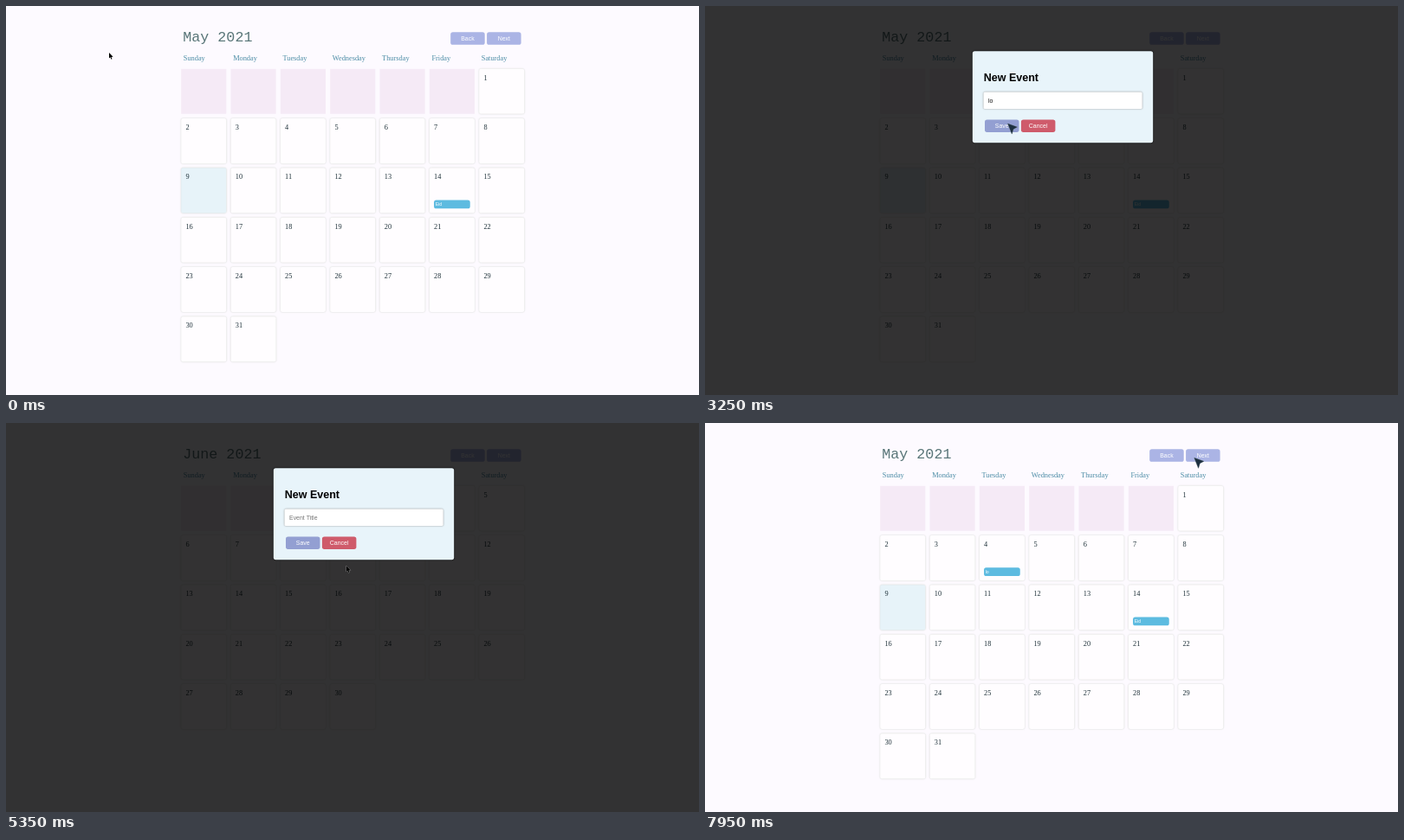
Recreate the animation shown at these times as an HTML page with a canvas. Size 800x450 px, loop 8 s.

```html
<!DOCTYPE html>
<html lang="en">
<head>
<meta charset="utf-8">
<title>Calendar</title>
<style>
  html, body { margin: 0; width: 100%; height: 100%; overflow: hidden; background: #fdfaff; }
  canvas { display: block; }
</style>
</head>
<body>
<canvas id="stage" width="800" height="450"></canvas>
<script>
const ctx = document.getElementById('stage').getContext('2d');
const LOOP = 8000, STEP = 50;
const SANS = '"Liberation Sans", Arial, sans-serif';
const SERIF = '"Liberation Serif", "Times New Roman", serif';
const MONO = '"Liberation Mono", "Courier New", monospace';
const WEEKDAYS = ['Sunday', 'Monday', 'Tuesday', 'Wednesday', 'Thursday', 'Friday', 'Saturday'];
const MAY = { title: 'May 2021', pad: 6, days: 31, today: 9 };
const JUNE = { title: 'June 2021', pad: 2, days: 30 };

const GRID = { x: 202.2, y: 72.7, pitch: 57.33, size: 52.1 };
const MODAL = { x: 308.8, y: 52.2, w: 208.4, h: 106 };
const INPUT = { x: 321.5, y: 99.5, w: 183.2, h: 19.6 };
const buttonRect = (x, y) => ({ x, y, w: 39.5, h: 14.5 });
const BACK = buttonRect(513.2, 30.3), NEXT = buttonRect(555.1, 30.3);
const SAVE = buttonRect(323, 131.4), CANCEL = buttonRect(364.9, 131.4);

// Each session types one character per step once typing begins.
const SESSIONS = [
  { open: 2000, caret: 2750, typing: 2800, close: 3550, word: 'lo' },
  { open: 4800, caret: 5750, typing: 5950, close: 6850, word: 'hello' }
];
const JUNE_SHOWN = 4100, MAY_SHOWN = 7600;

// Pointer moves: a straight line plus a one-sided bow and a two-sided swing.
const spot = (x, y) => ({ x, y });
const NONE = spot(0, 0);
const START = spot(119, 54), FIELD = spot(352, 115.5), SAVE_EDGE = spot(354, 132);
const move = (begin, end, to, bow = NONE, swing = NONE) => ({ begin, end, to, bow, swing });
const MOVES = [
  move(50, 400, spot(143, 187), spot(413, 0), spot(0, -70)),
  move(850, 900, spot(671, 72)),
  move(1000, 1750, spot(359.5, 159), NONE, spot(130, 105)),
  move(2000, 2500, FIELD),
  move(2950, 3300, spot(346, 139.5), spot(6, 0)),
  move(3550, 3900, spot(567, 39)),
  move(4100, 4550, spot(401.2, 175.5), spot(-210, 0)),
  move(5300, 5600, FIELD),
  move(5900, 6200, SAVE_EDGE),
  move(6400, 6650, spot(347.5, 141)),
  move(6850, 7250, spot(533, 38)),
  move(7650, 7950, spot(564.8, 40.3))
];

function pointerAt(t) {
  let from = START;
  for (const { begin, end, to, bow, swing } of MOVES) {
    if (t <= begin) break;
    if (t < end) {
      const k = (t - begin) / (end - begin);
      const along = axis => from[axis] + (to[axis] - from[axis]) * k +
        bow[axis] * Math.sin(Math.PI * k) + swing[axis] * Math.sin(2 * Math.PI * k);
      return spot(along('x'), along('y'));
    }
    from = to;
  }
  return from;
}

const inside = (p, r) => p.x >= r.x && p.x <= r.x + r.w && p.y >= r.y && p.y <= r.y + r.h;

function text(str, x, y, size, family, color, align = 'left', weight = '') {
  ctx.font = `${weight} ${size}px ${family}`;
  ctx.textAlign = align;
  ctx.fillStyle = color;
  ctx.fillText(str, x, y);
}

function box({ x, y, w, h }, color, radius, shadow = 'transparent') {
  ctx.save();
  ctx.shadowColor = shadow;
  ctx.shadowBlur = 2;
  ctx.fillStyle = color;
  ctx.beginPath();
  ctx.roundRect(x, y, w, h, radius);
  ctx.fill();
  ctx.restore();
}

function button(rect, label, color) {
  box(rect, color, 2.6);
  text(label, rect.x + rect.w / 2, rect.y + 9.7, 6.95, SANS, '#fff', 'center');
}

function cellRect(i) {
  const { x, y, pitch, size } = GRID;
  return { x: x + i % 7 * pitch, y: y + Math.floor(i / 7) * pitch, w: size, h: size };
}

const monthCells = month => Array.from({ length: month.pad + month.days }, (_, i) => cellRect(i));

function drawEvent(cell, label) {
  box({ x: cell.x + 5.2, y: cell.y + 37.2, w: 41.7, h: 9.8 }, '#5dbbe0', 2.6);
  text(label, cell.x + 6.8, cell.y + 43.9, 5.2, SANS, '#fff');
}

function drawMonth(month, events, pointer) {
  text(month.title, 204.3, 40.6, 16.7, MONO, '#587577');
  button(BACK, 'Back', '#abb4e5');
  button(NEXT, 'Next', '#abb4e5');
  WEEKDAYS.forEach((day, i) =>
    text(day, 204.8 + i * GRID.pitch, 63, 8.34, SERIF, '#4b8ca5'));
  monthCells(month).forEach((cell, i) => {
    const day = i - month.pad + 1;
    if (day < 1) return box(cell, '#f5eaf6', 0);
    const hovered = pointer && inside(pointer, cell);
    const fill = hovered ? '#eafbec' : day === month.today ? '#e7f3f9' : '#fffdff';
    box(cell, fill, 2, '#cbd0c8');
    text(day, cell.x + 5.2, cell.y + 13.1, 8.34, SERIF, '#1d3038');
    if (events[day]) drawEvent(cell, events[day]);
  });
}

function drawModal(session, t) {
  ctx.fillStyle = 'rgba(0,0,0,0.8)';
  ctx.fillRect(0, 0, 800, 450);
  box(MODAL, '#e8f4fa', 2.6, '#000');
  text('New Event', 321.8, 87, 12.5, SANS, '#000', 'left', 'bold');
  box(INPUT, '#fff', 1.6, '#888');
  const count = Math.floor((t - session.typing) / STEP) + 1;
  const typed = session.word.slice(0, Math.max(0, count));
  text(typed || 'Event Title', 327, 111.8, 6.95, SANS, typed ? '#111' : '#757575');
  if (!typed && t >= session.caret) box({ x: 326.6, y: 105, w: 0.7, h: 9 }, '#222', 0);
  button(SAVE, 'Save', '#939fd2');
  button(CANCEL, 'Cancel', '#cf5b6b');
}

function drawPointer({ x, y }, kind) {
  const shapes = {
    dart: { path: 'M0 0L11 4L6.5 6.4L4.8 12Z', fill: '#1d3040', edge: '#74818a' },
    arrow: { path: 'M0 0V6.4L1.5 5.2L2.5 7.7L3.5 7.2L2.5 4.9L4.6 4.8Z', fill: '#000', edge: '#fff8' },
    beam: { path: 'M-1.5 -4H1.5M0 -4V4M-1.5 4H1.5', fill: '#222', edge: '#222' }
  };
  const { path, fill, edge } = shapes[kind], outline = new Path2D(path);
  ctx.save();
  ctx.translate(x, y);
  ctx.lineWidth = 0.7;
  ctx.strokeStyle = edge;
  ctx.stroke(outline);
  ctx.fillStyle = fill;
  ctx.fill(outline);
  ctx.restore();
}

function draw(t) {
  const pointer = pointerAt(t);
  const [first, second] = SESSIONS;
  const session = SESSIONS.find(s => t >= s.open && t < s.close);
  const isJune = t >= JUNE_SHOWN && t < MAY_SHOWN;
  const month = isJune ? JUNE : MAY;
  const events = isJune
    ? { 9: t >= second.close && second.word }
    : { 4: t >= first.close && first.word, 14: 'Eid' };

  ctx.fillStyle = '#fdfaff';
  ctx.fillRect(0, 0, 800, 450);
  drawMonth(month, events, !session && pointer);
  if (session) drawModal(session, t);

  const targets = session ? [SAVE, CANCEL] : [BACK, NEXT, ...monthCells(month)];
  const opening = SESSIONS.some(s => t < s.open && t >= s.open - 2 * STEP);
  const kind = session && inside(pointer, INPUT) ? 'beam'
    : !opening && targets.some(rect => inside(pointer, rect)) ? 'dart' : 'arrow';
  drawPointer(pointer, kind);
}

const start = performance.now();
function tick() {
  const t = (performance.now() - start) % LOOP;
  draw(Math.floor(t / STEP) * STEP);
  requestAnimationFrame(tick);
}
tick();
</script>
</body>
</html>
```
